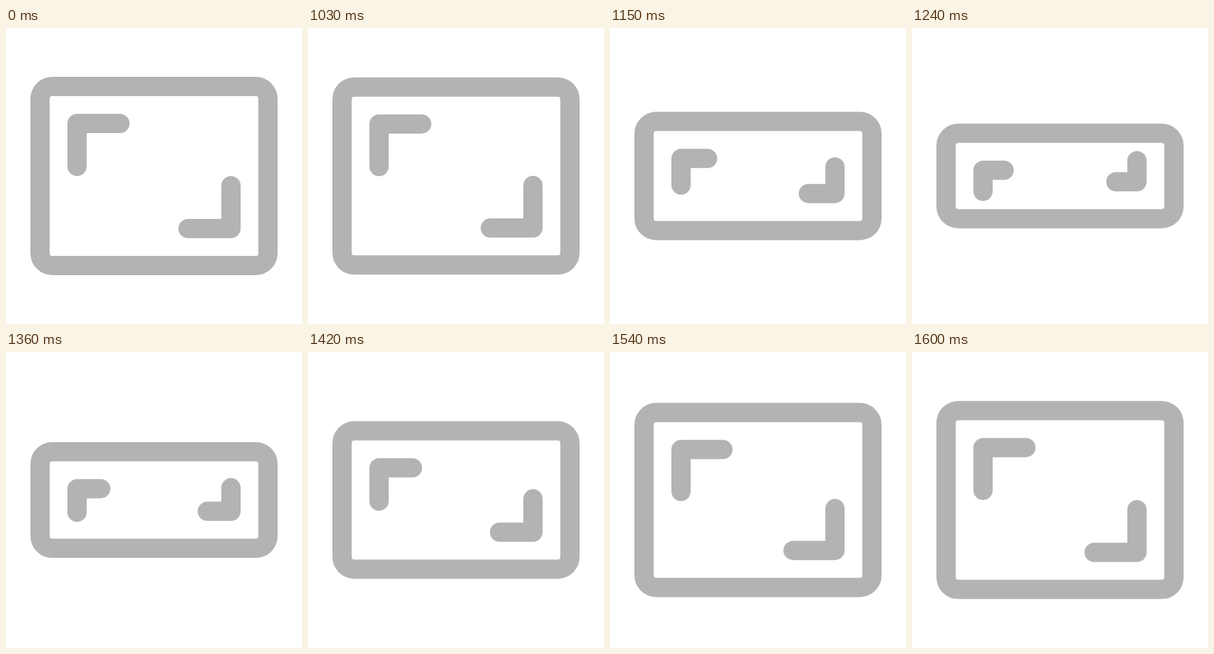
Animation, 400 px wide and 400 px high, one loop 1630 ms. Source, as an HTML page:

```html
<!DOCTYPE html>
<html lang="en">
<head>
<meta charset="utf-8">
<title>Aspect ratio icon</title>
<style>
  html, body { margin: 0; height: 100%; overflow: hidden; background: #fff; }
  svg { display: block; width: 100vw; height: 100vh; }
</style>
</head>
<body>
<svg viewBox="0 0 400 400" fill="none" stroke="#b3b3b3" stroke-width="26" stroke-linecap="round" stroke-linejoin="round">
  <rect id="frame" x="46" width="308" rx="16.5"/>
  <path id="corner"/>
  <use href="#corner" transform="rotate(180 200 200)"/>
</svg>
<script>
const LOOP = 1630, STEP = 30, FIRST = 1030;
const SHRINK = 1024, GROW = 1318, DURATION = 300, TRAVEL = 200 / 3;
const frame = document.getElementById('frame');
const corner = document.getElementById('corner');

const bezier = (a, b, s) => 3 * a * s * (1 - s) ** 2 + 3 * b * s * s * (1 - s) + s ** 3;

// cubic-bezier(.25, .1, .25, 1), solved by bisection
function ease(x) {
  if (x <= 0) return 0;
  if (x >= 1) return 1;
  let lo = 0, hi = 1;
  for (let i = 0; i < 30; i++) {
    const mid = (lo + hi) / 2;
    if (bezier(.25, .25, mid) < x) lo = mid; else hi = mid;
  }
  return bezier(.1, 1, lo);
}

function draw() {
  const now = performance.now() % LOOP;
  const t = FIRST + Math.floor((now - FIRST) / STEP) * STEP;
  const progress = t < GROW
    ? ease((t - SHRINK) / DURATION)
    : 1 - ease((t - GROW) / DURATION);
  const d = TRAVEL * progress;
  const arm = 58 - .467 * d;
  frame.setAttribute('y', 79 + d);
  frame.setAttribute('height', 242 - 2 * d);
  corner.setAttribute('d', `M96 ${129 + d + arm}V${129 + d}H${96 + arm}`);
  requestAnimationFrame(draw);
}
draw();
</script>
</body>
</html>
```
